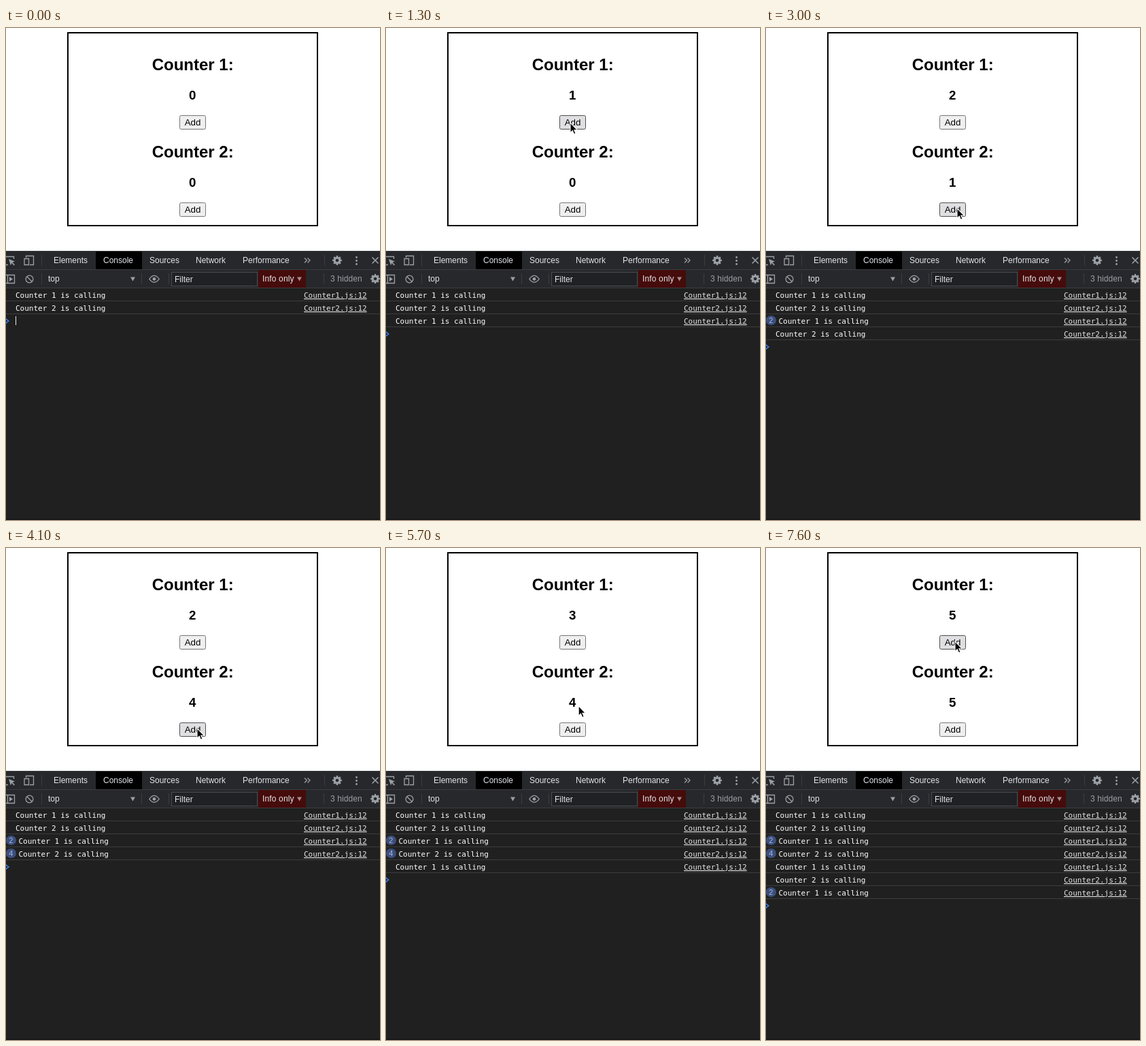
An HTML page that plays this animation: 550 by 722 pixels, repeating every 8000 ms.

```html
<!DOCTYPE html>
<html lang="en">
<head>
<meta charset="utf-8">
<title>Two counters</title>
<style>
  html, body { margin: 0; width: 100%; height: 100%; overflow: hidden; background: #fff; }
  svg { display: block; width: 550px; height: 722px; }
  text { font-family: "Liberation Sans", Arial, sans-serif; font-size: 12px; white-space: pre; }
  .head { font-size: 24px; font-weight: bold; text-anchor: middle; }
  .count { font-size: 18.72px; font-weight: bold; text-anchor: middle; }
  .label { font-size: 13.333px; text-anchor: middle; }
  .tool { fill: #e3e5e8; }
  .dim { fill: #9aa0a6; }
  .log, .link { font-family: "DejaVu Sans Mono", monospace; font-size: 11px; fill: #fff; }
  .link { fill: #e4e4e4; text-decoration: underline; }
  .badge { font-size: 11px; fill: #a9b9dc; text-anchor: middle; }
  .icon { fill: none; stroke: #9aa0a6; stroke-width: 1.3; }
  .rule { fill: none; stroke: #3c3d40; }
</style>
</head>
<body>
<svg viewBox="0 0 550 722">
  <rect width="550" height="722" fill="#fff"/>
  <rect x="91" y="7" width="367" height="283" fill="none" stroke="#000" stroke-width="2"/>
  <g id="page"></g>

  <rect y="327" width="550" height="395" fill="#202020"/>
  <rect y="327" width="550" height="55" fill="#27282b"/>
  <rect x="132" y="328" width="68" height="26" fill="#000"/>
  <path class="rule" d="M0 327.5H550M0 354.5H550M0 381.5H550M52.5 333V349M468.5 333V349M52.5 360V376M199.5 360V376M239.5 360V376M467.5 360V376"/>
  <path d="M0 721H550" stroke="#181818" stroke-width="2"/>
  <g id="tabs"></g>

  <g class="icon">
    <path d="M-1 335.5H11.5V339M-1 347.5H3"/>
    <path d="M4 339L13 342.6L9.6 343.9L13 347.3L11.8 348.5L8.4 345.1L7 348.4Z" fill="#9aa0a6" stroke="none"/>
    <path d="M29.5 337V334.5H40.5V347.5H35M27 338.5H33.5V347.5H27Z"/>
    <path d="M439 337.5L442.5 341L439 344.5M443.5 337.5L447 341L443.5 344.5"/>
    <path d="M538.5 336.5L547.5 345.5M547.5 336.5L538.5 345.5" stroke-width="1.6"/>
    <path d="M-1 362.5H12.5V374.5H-1M2.5 362V375"/>
    <path d="M5 365L10 368.5L5 372Z" fill="#9aa0a6" stroke="none"/>
    <circle cx="34.5" cy="368.5" r="5.4"/><path d="M30.7 364.7L38.3 372.3"/>
    <path d="M210.8 368.3Q218 358.5 225.2 368.3Q218 378.1 210.8 368.3Z"/>
    <circle cx="218" cy="368.3" r="2.4" fill="#9aa0a6" stroke="none"/>
  </g>
  <g class="dim">
    <circle cx="515.5" cy="336.5" r="1.4"/><circle cx="515.5" cy="341.5" r="1.4"/><circle cx="515.5" cy="346.5" r="1.4"/>
    <path d="M183 365.5H190L186.5 371.5Z"/>
  </g>
  <g id="gears"></g>
  <rect x="243.5" y="358.5" width="126" height="20" fill="#202124" stroke="#4a4b4e"/>
  <rect x="371" y="355" width="70" height="26" fill="#460b0b"/>
  <path d="M428 365.5H435L431.5 371.5Z" fill="#a08c8c"/>
  <text class="tool" x="62" y="372">top</text>
  <text class="tool" x="248" y="373">Filter</text>
  <text class="tool" x="377" y="372" letter-spacing=".15">Info only</text>
  <text class="dim" x="477" y="372" letter-spacing=".1">3 hidden</text>

  <g id="console"></g>
  <path id="prompt" d="M-.5 -3.5L3.8 0L-.5 3.5" fill="none" stroke="#3b7de8" stroke-width="1.6"/>
  <path id="caret" d="M14.5 423V436" stroke="#e8e8e8"/>
  <path id="cursor" d="M0 0V14.6L3.3 11.6L5.5 16.8L8 15.7L5.8 10.7H10.3Z" fill="#000" stroke="#fff" stroke-width="1.1"/>
</svg>
<script>
const LOOP = 8000, STEP = 100, ROW = 19;
const $ = id => document.getElementById(id);

// [time, counter]
const clicks = [
  [1000, 1], [1900, 1], [3000, 2], [3400, 2], [3600, 2],
  [3900, 2], [5300, 1], [6300, 2], [7300, 1], [7500, 1]
];

// Pointer trips: start, end, destination
const start = { x: 486, y: 252 };
const trips = [
  { from: 0, to: 900, x: 271, y: 139 },
  { from: 1900, to: 2700, x: 281, y: 264.5 },
  { from: 4200, to: 5100, x: 278, y: 138 },
  { from: 5300, to: 6100, x: 285, y: 266 },
  { from: 6400, to: 7100, x: 278, y: 137 }
];

const counters = [{ id: 1, y: 0 }, { id: 2, y: 128 }];

$("page").innerHTML = counters.map(({ id, y }) => `
  <g transform="translate(0 ${y})">
    <text class="head" x="274.7" y="62">Counter ${id}:</text>
    <text class="count" id="count${id}" x="274.3" y="105">0</text>
    <rect id="button${id}" x="255.5" y="128.5" width="38" height="20" rx="2"/>
    <text class="label" x="274.5" y="143">Add</text>
  </g>`).join("");

$("tabs").innerHTML = [["Elements", 70], ["Console", 143], ["Sources", 211], ["Network", 279], ["Performance", 348]]
  .map(([name, x]) => `<text class="tool" x="${x}" y="345">${name}</text>`).join("");

$("gears").innerHTML = [[487, 341], [543, 368]].map(([x, y]) => `
  <g transform="translate(${x} ${y})" fill="none" stroke="#9aa0a6">
    <circle r="3.9" stroke-width="3.2"/>
    <circle r="6" stroke-width="2" pathLength="16" stroke-dasharray="1" stroke-dashoffset=".5"/>
  </g>`).join("");

function pointerAt(t) {
  let { x, y } = start;
  for (const trip of trips) {
    if (t < trip.from) break;
    const u = Math.min(1, (t - trip.from) / (trip.to - trip.from));
    const k = 1 - (1 - u) ** 1.9;
    x += (trip.x - x) * k;
    y += (trip.y - y) * k;
  }
  return { x, y };
}

// Repeated messages collapse into one row with a badge
function logRows(done) {
  const rows = [];
  for (const id of [1, 2, ...done]) {
    const last = rows[rows.length - 1];
    if (last && last.id === id) last.times++;
    else rows.push({ id, times: 1 });
  }
  return rows;
}

function rowMarkup({ id, times }, i) {
  const y = 382 + i * ROW, repeated = times > 1;
  const badge = repeated ? `<rect x="0" y="${y + 40 - ROW * 2 + 1 - 1}" width="15" height="14" rx="7" fill="#3c4f7d"/>
    <text class="badge" x="7.3" y="${y + 13}">${times}</text>` : "";
  return `${badge}<text class="log" x="${repeated ? 18.5 : 14}" y="${y + 14}">Counter ${id} is calling</text>
    <text class="link" x="438" y="${y + 14}">Counter${id}.js:12</text>
    <path class="rule" d="M0 ${y + 18.5}H550"/>`;
}

let drawn = -1;

function draw(time) {
  const t = Math.floor(time % LOOP / STEP) * STEP;
  if (t === drawn) return;
  drawn = t;

  const done = clicks.filter(c => c[0] <= t).map(c => c[1]);
  const p = pointerAt(t);
  for (const { id, y } of counters) {
    const hover = p.x >= 255 && p.x <= 294 && p.y >= 128 + y && p.y <= 149 + y;
    $("count" + id).textContent = done.filter(c => c === id).length;
    $("button" + id).setAttribute("fill", hover ? "#dfdfe1" : "#efefef");
    $("button" + id).setAttribute("stroke", hover ? "#4f4f4f" : "#767676");
  }

  const rows = logRows(done);
  $("console").innerHTML = rows.map(rowMarkup).join("");
  $("prompt").setAttribute("transform", `translate(0 ${392 + rows.length * ROW})`);
  $("caret").style.display = t < 500 ? "" : "none";
  $("cursor").style.display = t > 0 ? "" : "none";
  $("cursor").setAttribute("transform", `translate(${p.x} ${p.y})`);
}

const began = performance.now();
function tick() {
  draw(performance.now() - began);
  requestAnimationFrame(tick);
}
draw(0);
requestAnimationFrame(tick);
</script>
</body>
</html>
```
